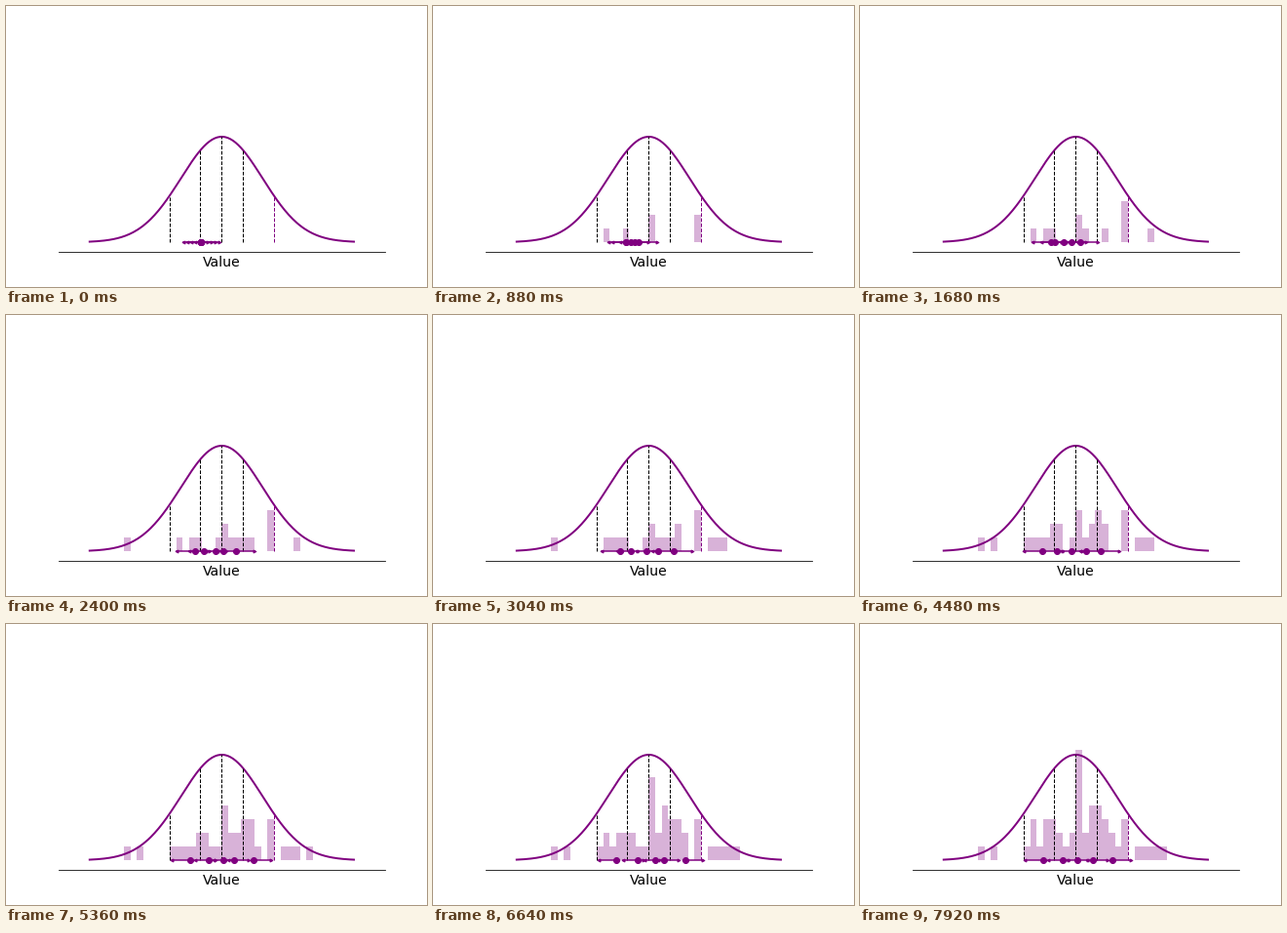
A matplotlib script for the animation above (8000 ms loop, 432 by 288 pixels).

```python
import numpy as np
import matplotlib.pyplot as plt
from matplotlib.animation import FuncAnimation

COLOR = "purple"
BIN = 0.16
N_BINS = 50
FRAMES = 100
RATE = 0.1
ARROW = 0.5
HEIGHT = 120 * BIN
TAUS = np.array([0.1, 0.3, 0.5, 0.7, 0.9])
QUANTILES = [-1.2816, -0.5244, 0, 0.5244, 1.2816]

# Bin that each successive random sample falls into
SAMPLE_BINS = [
    32, 18, 21, 25, 32, 25, 26, 29, 32, 20,
    36, 27, 28, 24, 10, 34, 19, 29, 35, 25,
    12, 28, 22, 27, 21, 22, 17, 28, 29, 25,
    26, 30, 23, 38, 37, 25, 20, 25, 27, 27,
    18, 30, 31, 20, 25, 28, 18, 25, 21, 24,
]


def density(x):
    return HEIGHT * np.exp(-np.square(x) / 2) / np.sqrt(2 * np.pi)


def learn_quantiles():
    """Estimates before the first sample and after each one."""
    history = [np.full(len(TAUS), -0.5)]
    for k in SAMPLE_BINS:
        value = (k + 0.5 - N_BINS / 2) * BIN
        history.append(history[-1] + RATE * (TAUS - (value < history[-1])))
    return history


history = learn_quantiles()

fig, ax = plt.subplots(figsize=(6, 4), dpi=72)
fig.subplots_adjust(left=0.125, right=0.9, bottom=0.125, top=0.88)
ax.set(xlim=(-4, 4), ylim=(-0.7, 14.7), xticks=[], yticks=[])
ax.spines[["left", "right", "top"]].set_visible(False)
ax.set_xlabel("Value", fontsize=14)

edges = (np.arange(N_BINS) - N_BINS / 2) * BIN
bars = ax.bar(edges, np.zeros(N_BINS), BIN, align="edge", color=COLOR,
              alpha=0.3, linewidth=0)
xs = np.linspace(-3.24, 3.24, 200)
ax.plot(xs, density(xs), color=COLOR, lw=2)
for q in QUANTILES:
    ax.plot([q, q], [0, density(q)], "--", lw=1,
            color=COLOR if q > 1 else "black")

dots, = ax.plot([], [], "o", color=COLOR, ms=6)
left_heads, = ax.plot([], [], "<", color=COLOR, ms=3)
right_heads, = ax.plot([], [], ">", color=COLOR, ms=3)
shafts = [ax.plot([], [], color=COLOR, lw=1.5)[0] for _ in TAUS]


def update(frame):
    # A sample lands on odd frames; the estimates react on the next one.
    counts = np.bincount(SAMPLE_BINS[:(frame + 1) // 2], minlength=N_BINS)
    for bar, count in zip(bars, counts):
        bar.set_height(count)
    pos = history[frame // 2]
    left, right = pos - ARROW * (1 - TAUS), pos + ARROW * TAUS
    zeros = np.zeros(len(TAUS))
    dots.set_data(pos, zeros)
    left_heads.set_data(left, zeros)
    right_heads.set_data(right, zeros)
    for shaft, a, b in zip(shafts, left, right):
        shaft.set_data([a, b], [0, 0])
    return [*bars, dots, left_heads, right_heads, *shafts]


anim = FuncAnimation(fig, update, frames=FRAMES, interval=80, repeat=True,
                     repeat_delay=0)
plt.show()
```
